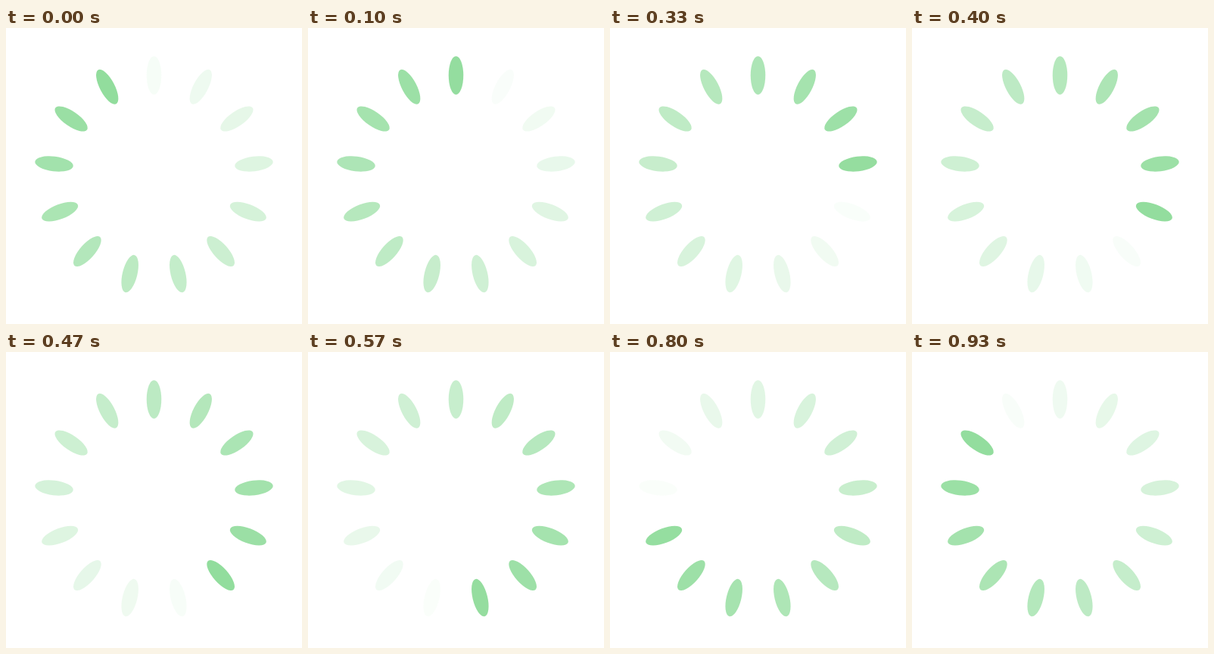
An HTML page that plays this animation: 391 by 391 pixels, repeating every 1 s.

```html
<!DOCTYPE html>
<html lang="en">
<head>
<meta charset="utf-8">
<title>Spinner</title>
<style>
  html, body { margin: 0; width: 100%; height: 100%; overflow: hidden; background: #fff; }
  svg { display: block; width: 100vw; height: 100vh; }
</style>
</head>
<body>
<svg id="stage" viewBox="0 0 100 100" fill="#92dd9d"></svg>
<script>
const COUNT = 13;
const LOOP = 1000;
const FPS = 30;
const stage = document.getElementById('stage');

const petals = Array.from({ length: COUNT }, (_, i) => {
  const petal = document.createElementNS('http://www.w3.org/2000/svg', 'ellipse');
  const attrs = { cx: 50, cy: 16, rx: 2.5, ry: 6.5, transform: `rotate(${i * 360 / COUNT} 50 50)` };
  for (const name in attrs) petal.setAttribute(name, attrs[name]);
  return stage.appendChild(petal);
});

// The picture holds between ticks: the first two, then the first tick after each petal lights up.
const ticks = [0, 1];
for (let k = 1; k < COUNT; k++) ticks.push(Math.ceil(k * FPS / COUNT));
const startOf = tick => Math.round(tick * 100 / FPS) * 10;

function draw(ms) {
  const now = ms % LOOP;
  const tick = ticks.filter(n => startOf(n) <= now).pop();
  const phase = tick / FPS;
  petals.forEach((petal, i) => {
    const alpha = ((i + 1) / COUNT - phase + 1) % 1;
    petal.setAttribute('opacity', alpha < 1e-6 ? 1 : alpha);
  });
}

let start;
function loop(time) {
  start ??= time;
  draw(time - start);
  requestAnimationFrame(loop);
}
draw(0);
requestAnimationFrame(loop);
</script>
</body>
</html>
```
